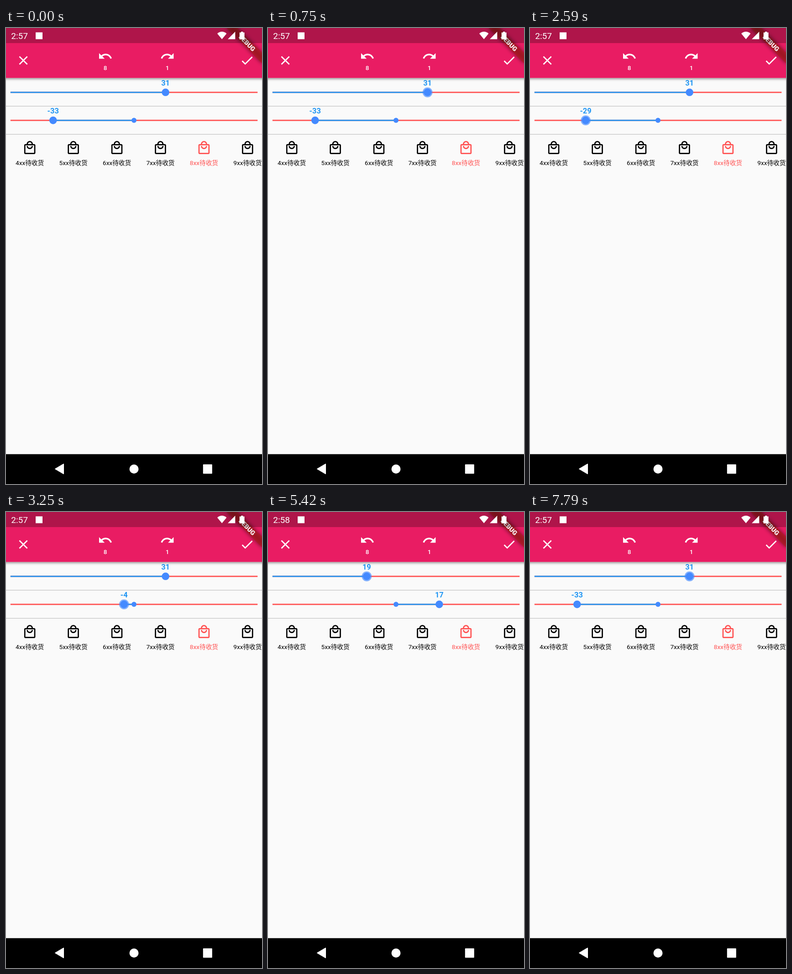
An HTML page for the animation above (8 s loop, 561x998 px).

```html
<!DOCTYPE html>
<html lang="zh">
<head>
<meta charset="utf-8">
<title>Sliders</title>
<style>
  html, body { margin: 0; width: 100%; height: 100%; overflow: hidden; background: #fafafa; }
  svg { display: block; width: 561px; height: 998px; }
  text { font-family: Roboto, "Noto Sans CJK SC", "Noto Sans CJK", sans-serif; text-anchor: middle; }
  .value { font-size: 16.4px; font-weight: 700; fill: #2196f3; }
  .count { font-size: 13.6px; font-weight: 500; fill: #fff; }
  .label { font-size: 13.64px; }
  .track { stroke-width: 2.8; }
</style>
</head>
<body>
<svg viewBox="0 0 561 998">
  <defs>
    <filter id="barShadow" x="-5%" y="-20%" width="110%" height="150%">
      <feDropShadow dx="0" dy="2.5" stdDeviation="2.6" flood-opacity=".42"/>
    </filter>
    <filter id="blur" x="-20%" y="-100%" width="140%" height="300%">
      <feGaussianBlur stdDeviation="4.5"/>
    </filter>
    <path id="undo" d="M12.5 8c-2.65 0-5.05.99-6.9 2.6L2 7v9h9l-3.62-3.62c1.39-1.16 3.16-1.88 5.12-1.88 3.54 0 6.55 2.31 7.6 5.5l2.37-.78C21.08 11.03 17.15 8 12.5 8z"/>
    <path id="close" d="M19 6.41L17.59 5 12 10.59 6.41 5 5 6.41 10.59 12 5 17.59 6.41 19 12 13.41 17.59 19 19 17.59 13.41 12z"/>
    <path id="check" d="M9 16.17L4.83 12l-1.42 1.41L9 19 21 7l-1.41-1.41z"/>
    <path id="bag" d="M19 6h-2c0-2.76-2.24-5-5-5S7 3.24 7 6H5c-1.1 0-1.99.9-1.99 2L3 20c0 1.1.9 2 2 2h14c1.1 0 2-.9 2-2V8c0-1.1-.9-2-2-2zm-7-3c1.66 0 3 1.34 3 3H9c0-1.66 1.34-3 3-3zm7 17H5V8h14v12zm-7-8c-1.66 0-3-1.34-3-3H7c0 2.76 2.24 5 5 5s5-2.24 5-5h-2c0 1.66-1.34 3-3 3z"/>
  </defs>

  <rect width="561" height="998" fill="#fafafa"/>
  <path d="M0 171.2H561M0 232.7H561" stroke="#c1c1c1" stroke-width="1.2"/>
  <g id="list"></g>
  <g id="sliders"></g>

  <rect x="-10" y="-10" width="581" height="119.2" fill="#e91e63" filter="url(#barShadow)"/>
  <g fill="#fff">
    <use href="#close" transform="translate(38 71) scale(1.364) translate(-12 -12)"/>
    <use href="#undo" transform="translate(217.6 61.8) scale(1.364) translate(-12 -12)"/>
    <use href="#undo" transform="translate(353.7 61.8) scale(-1.364 1.364) translate(-12 -12)"/>
    <use href="#check" transform="translate(528.3 71) scale(1.364) translate(-12 -12)"/>
  </g>
  <text class="count" x="217.7" y="91.5">8</text>
  <text class="count" x="353.7" y="91.5">1</text>

  <g transform="translate(561 0) rotate(45)">
    <rect x="-54.6" y="38.2" width="109.2" height="16.4" opacity=".5" filter="url(#blur)"/>
    <rect x="-54.6" y="38.2" width="109.2" height="16.4" fill="#b71c1c" fill-opacity=".63"/>
    <text y="51.2" font-size="13.9" font-weight="900" fill="#fff">DEBUG</text>
  </g>

  <rect width="561" height="33" fill-opacity=".25"/>
  <g fill="#fff">
    <text id="clock" x="29.6" y="24" font-size="19.1">2:57</text>
    <rect x="65" y="9.5" width="15" height="15"/>
    <path d="M463 12.2Q473.2 4 483.4 12.2L473.2 24.6Z"/>
    <path d="M502.3 8V24.4H486Z"/>
    <path d="M515 8h4.4v1.7h3.2V25H511.8V9.7H515Z"/>
  </g>

  <rect y="932.7" width="561" height="65.3"/>
  <g fill="#fff" stroke="#fff" stroke-linejoin="round" stroke-width="2">
    <path d="M108.2 965L126 954.6V975.4Z"/>
    <circle cx="280.5" cy="965.2" r="9"/>
    <path d="M432.8 956h18v18.6h-18z"/>
  </g>
</svg>
<script>
  const LOOP = 8000, LEFT = 9.8, RIGHT = 551.3, MIDDLE = 280.5;
  const RED = '#ff5252', BLUE = '#2196f3', THUMB = '#448aff';
  const $ = id => document.getElementById(id);

  function add(parent, tag, attrs, text = '') {
    const el = document.createElementNS('http://www.w3.org/2000/svg', tag);
    for (const key in attrs) el.setAttribute(key, attrs[key]);
    el.textContent = text;
    return parent.appendChild(el);
  }

  // Steps are [time, position]; movement between them is linear.
  const firstSteps = [[0, 349.6], [4800, 349.6], [5420, 216.4], [5720, 190.2], [7750, 190.2], [7750, 349.6]];
  const secondSteps = [[0, 103.2], [2500, 103.2], [3250, 258.5], [3900, 375.3], [7750, 375.3], [7750, 103.2]];
  const firstPresses = [[40, 1900], [4700, 5900], [7790, 8000]];
  const secondPresses = [[2300, 4200]];

  function at(steps, t) {
    const i = steps.findLastIndex(step => step[0] <= t);
    const [t0, a] = steps[i], [t1, b] = steps[i + 1] || [Infinity, a];
    return a + (b - a) * (t - t0) / (t1 - t0);
  }

  const within = (spans, t) => spans.some(([from, to]) => t >= from && t < to);

  function slider(y, origin, min, max, steps, presses) {
    const g = $('sliders');
    add(g, 'path', { class: 'track', d: `M${LEFT} ${y}H${RIGHT}`, stroke: RED });
    const active = add(g, 'path', { class: 'track', stroke: BLUE });
    if (origin > LEFT) add(g, 'circle', { cx: origin, cy: y, r: 5.5, fill: THUMB });
    const halo = add(g, 'circle', { cy: y, r: 10.9, fill: THUMB, 'fill-opacity': .65 });
    const thumb = add(g, 'circle', { cy: y, r: 8.3, fill: THUMB });
    const value = add(g, 'text', { class: 'value', y: y - 14.8 });
    return t => {
      const x = at(steps, t);
      active.setAttribute('d', `M${origin} ${y}H${x}`);
      halo.setAttribute('cx', x);
      halo.setAttribute('visibility', within(presses, t) ? 'visible' : 'hidden');
      thumb.setAttribute('cx', x);
      value.setAttribute('x', x);
      value.textContent = Math.round(min + (max - min) * (x - LEFT) / (RIGHT - LEFT));
    };
  }

  const updates = [
    slider(140.8, LEFT, 0, 50, firstSteps, firstPresses),
    slider(202.1, MIDDLE, -50, 50, secondSteps, secondPresses)
  ];

  for (let i = 0; i < 10; i++) {
    const item = add($('list'), 'g', {
      transform: `translate(${52.1 + 95.45 * (i - 4)} 0)`, fill: i === 8 ? RED : '#000'
    });
    add(item, 'use', { href: '#bag', transform: 'translate(0 262.3) scale(1.364) translate(-12 -12)' });
    add(item, 'text', { class: 'label', y: 300.4 }, `${i}xx待收货`);
  }

  // A short drag followed by a decelerating fling to the start of the list.
  function scroll(t) {
    if (t < 6800 || t >= 7750) return 0;
    if (t < 6920) return 29.6 * (t - 6800) / 120;
    const p = Math.min(1, (t - 6920) / 710);
    return 29.6 + 348 * (1 - (1 - p) ** 2);
  }

  function draw(now) {
    const t = now % LOOP;
    updates.forEach(update => update(t));
    $('list').setAttribute('transform', `translate(${scroll(t)} 0)`);
    $('clock').textContent = t >= 4200 && t < 7750 ? '2:58' : '2:57';
  }

  const start = performance.now();
  function tick() {
    draw(performance.now() - start);
    requestAnimationFrame(tick);
  }
  tick();
</script>
</body>
</html>
```
